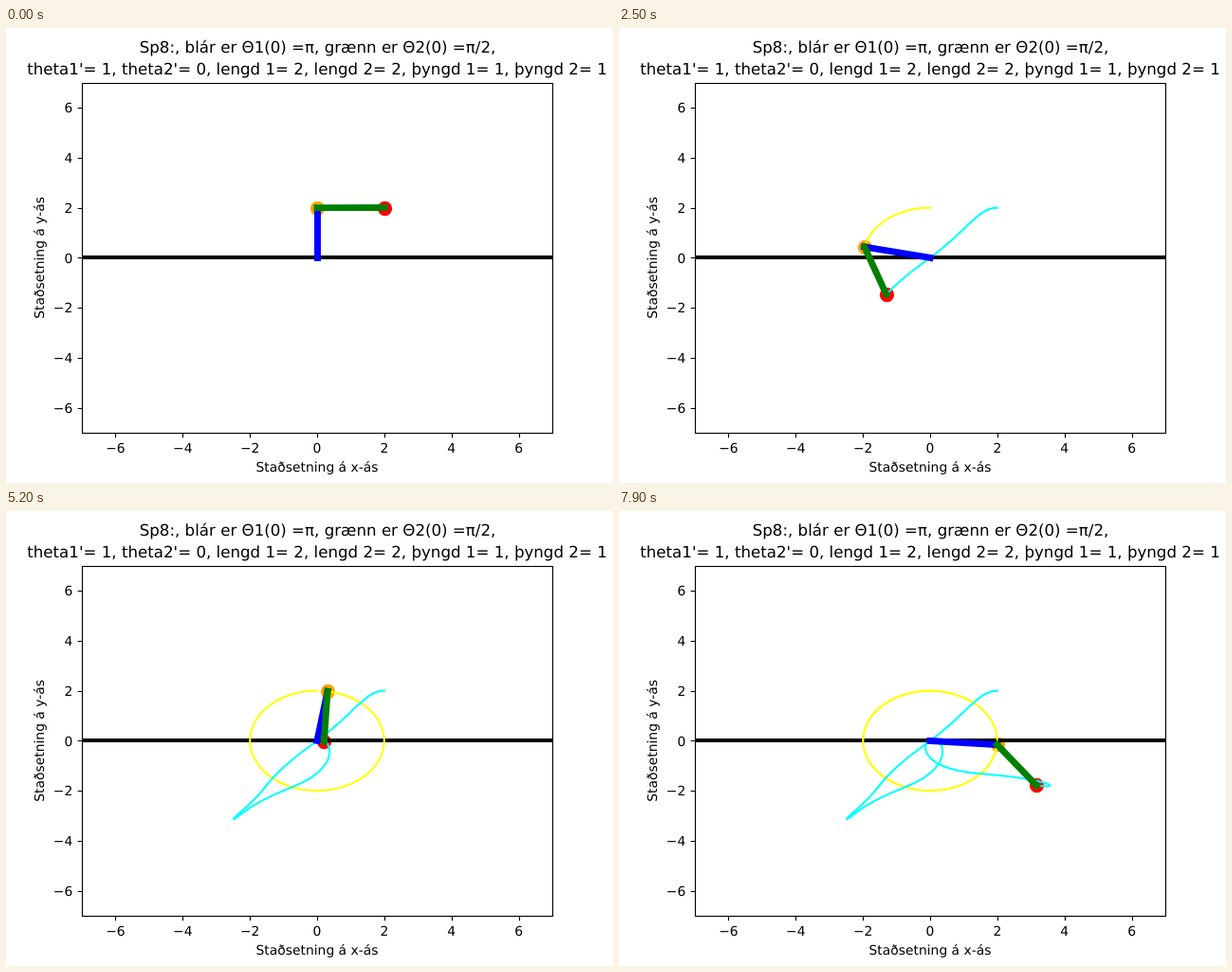
Write an HTML page that moves like this. It is 640 px wide and 480 px high and loops after 8000 ms.

```html
<!DOCTYPE html>
<html lang="is">
<head>
<meta charset="utf-8">
<title>Tvöfaldur pendúll</title>
<style>
  html, body { margin: 0; width: 100%; height: 100%; overflow: hidden; background: #fff; }
  svg { display: block; }
  text {
    font: 13.89px "DejaVu Sans", Verdana, sans-serif;
    text-anchor: middle;
    text-rendering: geometricPrecision;
  }
  .title { font-size: 16.67px; }
  .right { text-anchor: end; }
  .axis { fill: none; stroke: #000; stroke-width: 1.11; }
  .trail { fill: none; stroke-width: 2.08; stroke-linejoin: round; stroke-linecap: square; }
  .rod { stroke-width: 6.94; stroke-linecap: square; }
</style>
</head>
<body>
<svg id="stage" width="640" height="480" viewBox="0 0 640 480"></svg>
<script>
const STEP = 100, FRAMES = 80, LENGTH = 2;
const stage = document.getElementById('stage');

function add(tag, attrs, text) {
  const el = document.createElementNS('http://www.w3.org/2000/svg', tag);
  set(el, attrs);
  if (text) el.textContent = text;
  stage.append(el);
  return el;
}

function set(el, attrs) {
  for (const key in attrs) el.setAttribute(key, attrs[key]);
}

const px = x => 328 + x * 496 / 14;
const py = y => 242.4 - y * 369.6 / 14;
const crisp = v => Math.round(v) + 0.5;

// Moving parts, back to front
const orange = add('circle', { r: 7.64, fill: 'orange' });
const red = add('circle', { r: 7.64, fill: 'red' });
add('path', { d: 'M80 242H576', stroke: '#000', 'stroke-width': 4.17 });
const yellowTrail = add('polyline', { class: 'trail', stroke: 'yellow' });
const cyanTrail = add('polyline', { class: 'trail', stroke: 'cyan' });
const blueRod = add('line', { class: 'rod', stroke: 'blue' });
const greenRod = add('line', { class: 'rod', stroke: 'green' });

// Axes and labels
add('rect', { class: 'axis', x: 80.5, y: 58.5, width: 496, height: 369 });
for (let v = -6; v <= 6; v += 2) {
  const label = String(v).replace('-', '\u2212');
  const x = crisp(px(v)), y = crisp(py(v));
  add('path', { class: 'axis', d: `M${x} 427.5v4.86M80.5 ${y}h-4.86` });
  add('text', { x: px(v), y: 448 }, label);
  add('text', { class: 'right', x: 70.3, y: Math.round(py(v) + 5.2) }, label);
}
add('text', { x: 328, y: 468 }, 'Staðsetning á x-ás');
add('text', { transform: 'translate(40 242.4) rotate(-90)' }, 'Staðsetning á y-ás');
add('text', { class: 'title', x: 328.5, y: 26 }, 'Sp8:, blár er Θ1(0) =π, grænn er Θ2(0) =π/2,');
add('text', { class: 'title', x: 328, y: 49 },
  "theta1'= 1, theta2'= 0, lengd 1= 2, lengd 2= 2, þyngd 1= 1, þyngd 2= 1");

// Step, turn of the first rod from upright, angle of the second rod from hanging
const poses = [
  [0, 0, 1.571], [5, 0.208, 1.504], [9, 0.377, 1.352], [15, 0.637, 1.008],
  [18, 0.784, 0.788], [25, 1.353, 0.33], [27, 1.605, 0.17], [31.8, 2.471, -0.671],
  [36, 3.297, -1.36], [42, 4.353, -1.254], [45, 4.909, -0.96], [52, 6.128, -0.05],
  [54, 6.47, 0.231], [63, 8.084, 1.435], [66, 8.667, 1.742], [72, 9.655, 1.83],
  [77, 10.53, 1.105], [79, 10.918, 0.624]
];

// Smooth curve through the chosen column of the poses
function curve(col) {
  const t = poses.map(p => p[0]), v = poses.map(p => p[col]);
  const last = t.length - 1;
  const gap = i => t[i + 1] - t[i];
  const rate = i => (v[i + 1] - v[i]) / gap(i);
  const slope = t.map((_, i) => i > 0 && i < last
    ? (rate(i - 1) * gap(i) + rate(i) * gap(i - 1)) / (gap(i - 1) + gap(i)) : 0);
  slope[0] = 2 * rate(0) - slope[1];
  slope[last] = 2 * rate(last - 1) - slope[last - 1];
  return n => {
    let i = 0;
    while (i < last - 1 && n > t[i + 1]) i++;
    const h = gap(i), u = (n - t[i]) / h, w = 1 - u;
    return w * w * ((1 + 2 * u) * v[i] + u * h * slope[i])
         + u * u * ((1 + 2 * w) * v[i + 1] - w * h * slope[i + 1]);
  };
}

const turn = curve(1), swing = curve(2);

function joints(n) {
  const a = turn(n), b = swing(n);
  const x = -LENGTH * Math.sin(a), y = LENGTH * Math.cos(a);
  return {
    mid: [px(x), py(y)],
    end: [px(x + LENGTH * Math.sin(b)), py(y - LENGTH * Math.cos(b))]
  };
}

const path = Array.from({ length: FRAMES }, (_, n) => joints(n));
const trace = (key, n) => path.slice(0, n + 1).map(p => p[key].join()).join(' ');
const pivot = [px(0), py(0)];

// Upright and level rods sit on whole pixels
function placeRod(el, from, to) {
  const straight = from.some((v, i) => Math.abs(v - to[i]) < 0.01);
  const [x1, y1, x2, y2] = [...from, ...to].map(v => straight ? crisp(v) : v);
  set(el, { x1, y1, x2, y2 });
}

function placeDot(el, [x, y]) {
  set(el, { cx: crisp(x), cy: crisp(y) });
}

function draw(n) {
  const { mid, end } = path[n];
  placeDot(orange, mid);
  placeDot(red, end);
  set(yellowTrail, { points: n ? trace('mid', n) : '' });
  set(cyanTrail, { points: n ? trace('end', n) : '' });
  placeRod(blueRod, pivot, mid);
  placeRod(greenRod, mid, end);
}

const start = performance.now();
let shown = -1;

function tick() {
  const n = Math.floor((performance.now() - start) / STEP) % FRAMES;
  if (n !== shown) draw(shown = n);
  requestAnimationFrame(tick);
}
tick();
</script>
</body>
</html>
```
